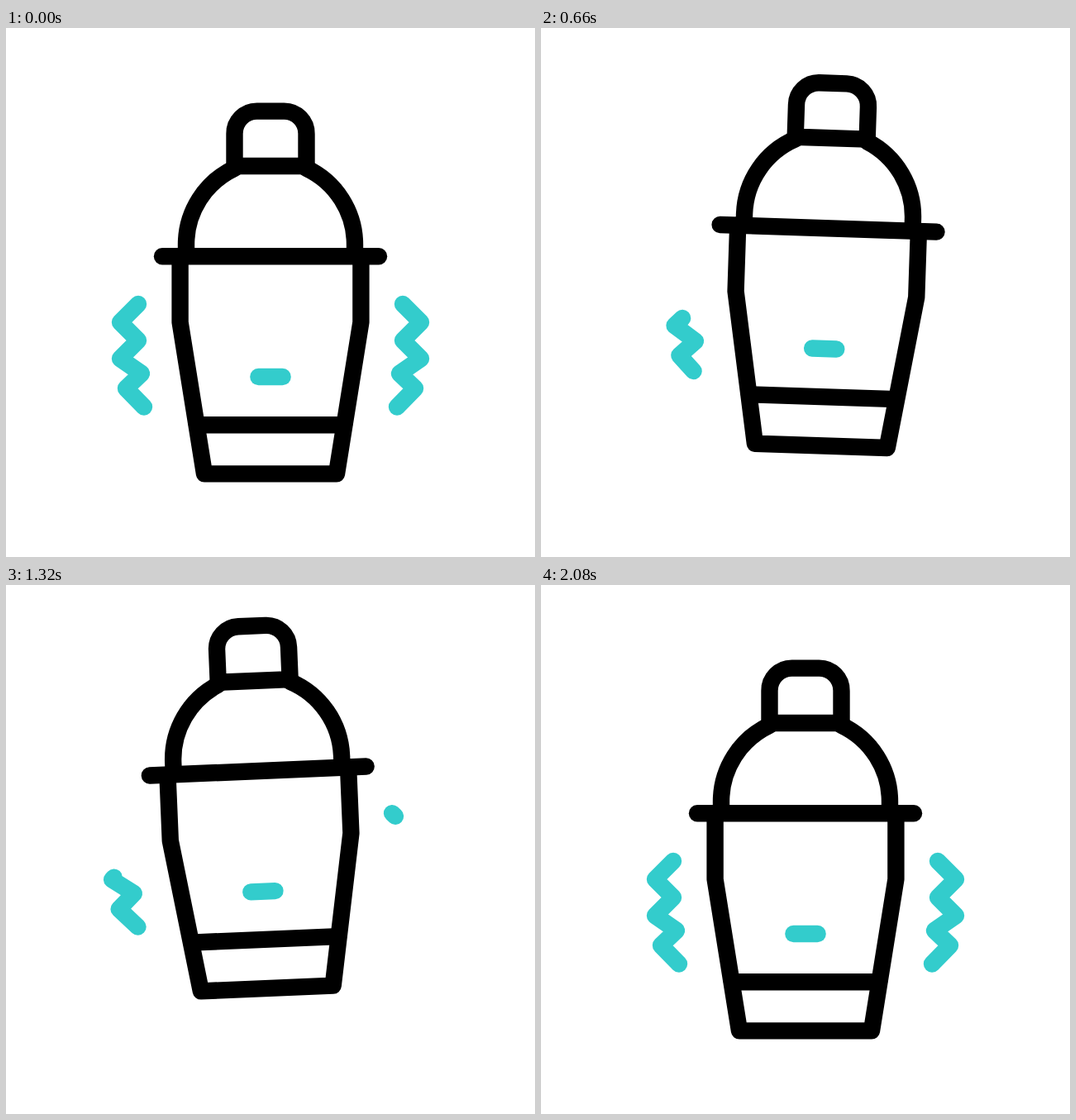
These frames come from a looping animation (640x640 px, 2400 ms). An HTML page:

```html
<!DOCTYPE html>
<html lang="en">
<head>
<meta charset="utf-8">
<title>Shaker</title>
<style>
  html, body { margin: 0; width: 100%; height: 100%; overflow: hidden; background: #fff; }
  svg { display: block; width: 100%; height: 100%; }
  path { fill: none; stroke: #000; stroke-width: 20.4; stroke-linecap: round; stroke-linejoin: round; }
  .accent { stroke: #33cccc; }
</style>
</head>
<body>
<svg viewBox="0 0 640 640">
  <g id="shaker">
    <path d="M276.5 167V128A27 27 0 0 1 303.5 100.6H336.5A27 27 0 0 1 363.5 128V167Z"/>
    <path d="M218 276V262A102 102 0 0 1 276.5 169.7M422 276V262A102 102 0 0 0 363.5 169.7"/>
    <path d="M189 276.2H451"/>
    <path d="M210.6 276V356L240 539.4H400L429.4 356V276"/>
    <path d="M231 480.2H409"/>
    <path class="accent" d="M305.4 422H334.6"/>
    <path class="accent" id="left" pathLength="1" d="M160 334L138 356L160 378L138 400L164 418L145 436L167 458.5"/>
    <path class="accent" id="right" pathLength="1" d="M480 334L502 356L480 378L502 400L476 418L495 436L473 458.5"/>
  </g>
</svg>
<script>
const LOOP = 2400, STEP = 20, MOVE_END = 2080;
const DRAW = 370, WIPE = 320;
const shaker = document.getElementById("shaker");

// Key poses of the shake: it swings left and right on the way up, then again on the way down.
const poses = [
  { t: 0, x: 0, y: 0, tilt: 0 },
  { t: 320, x: -21.8, y: -4.8, tilt: 2.3 },
  { t: 500, x: -26, y: -17.2, tilt: 2.5 },
  { t: 660, x: 26.1, y: -33.9, tilt: 1.9 },
  { t: 790, x: 46, y: -43.5, tilt: 1.4 },
  { t: 1020, x: 9.9, y: -52.6, tilt: 0.15 },
  { t: 1320, x: -13.4, y: -51.2, tilt: -2.4 },
  { t: 1560, x: -29, y: -33, tilt: -2.1 },
  { t: 1740, x: 23.6, y: -20, tilt: -1.35 },
  { t: 1840, x: 32, y: -13, tilt: -1 },
  { t: MOVE_END, x: 0, y: 0, tilt: 0 }
];

// Speed of one property through a pose; the first and last pose are at rest.
function speed(i, key) {
  const before = poses[i - 1], pose = poses[i], after = poses[i + 1];
  if (!before || !after) return 0;
  const a = pose.t - before.t, b = after.t - pose.t;
  return ((pose[key] - before[key]) / a * b + (after[key] - pose[key]) / b * a) / (a + b);
}

function poseAt(t, key) {
  const j = Math.max(1, poses.findIndex(pose => t <= pose.t)), i = j - 1;
  const d = poses[j].t - poses[i].t, u = (t - poses[i].t) / d, w = 1 - u;
  return w * w * ((1 + 2 * u) * poses[i][key] + u * d * speed(i, key))
       + u * u * ((1 + 2 * w) * poses[j][key] - w * d * speed(j, key));
}

function ease(t, from, to) {
  const u = Math.min(1, Math.max(0, (t - from) / (to - from)));
  return u * u * (3 - 2 * u);
}

// Each zigzag is drawn in from the top, then wiped away from the top, at these start times.
const zigzags = [
  { path: document.getElementById("left"), draws: [-DRAW, 330, 925, 1459], wipes: [0, 513, 1162] },
  { path: document.getElementById("right"), draws: [-DRAW, 665, 1282, 1875], wipes: [209, 880, 1555] }
];

function trim({ path, draws, wipes }, t) {
  const pass = draws.filter(start => t >= start).length - 1;
  const end = ease(t, draws[pass], Math.min(draws[pass] + DRAW, MOVE_END));
  const start = pass < wipes.length ? ease(t, wipes[pass], wipes[pass] + WIPE) : 0;
  const length = end - start;
  path.style.display = length > 0.001 ? "" : "none";
  path.style.strokeDasharray = length >= 1 ? "none" : `${length} 2`;
  path.style.strokeDashoffset = -start;
}

function render(time) {
  const t = Math.min(MOVE_END, Math.floor((time % LOOP) / STEP) * STEP);
  const [x, y, tilt] = ["x", "y", "tilt"].map(key => poseAt(t, key));
  shaker.setAttribute("transform", `translate(${x} ${y}) rotate(${tilt} 320 320)`);
  zigzags.forEach(zigzag => trim(zigzag, t));
}

const began = performance.now();
function tick() {
  render(performance.now() - began);
  requestAnimationFrame(tick);
}
tick();
</script>
</body>
</html>
```
